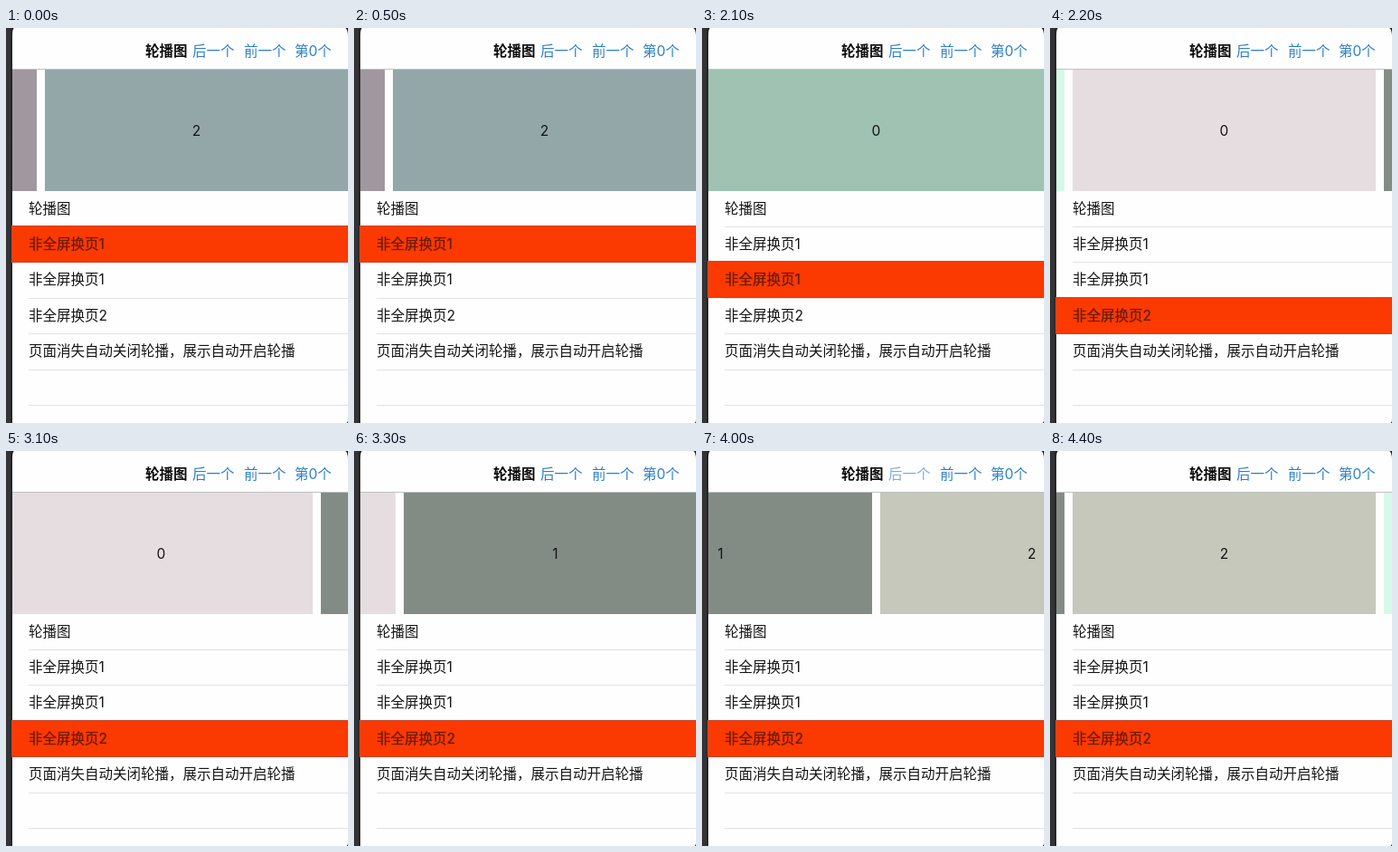
An HTML page for the animation above (4500 ms loop, 378 by 436 pixels).

```html
<!DOCTYPE html>
<html lang="zh-CN">
<head>
<meta charset="utf-8">
<title>轮播图</title>
<style>
  html, body { margin: 0; width: 100%; height: 100%; overflow: hidden; background: #303032; }
  #stage {
    position: absolute; left: 0; top: 0; width: 378px; height: 436px; overflow: hidden;
    background: linear-gradient(90deg, #343436 0 4px, #1f1f20 7px);
    font: 400 15.5px/20px Inter, "Noto Sans CJK SC", "Noto Sans CJK", sans-serif;
    color: #151515; white-space: nowrap;
  }
  #stage * { position: absolute; box-sizing: border-box; }
  #screen { left: 7px; top: 0; width: 371px; height: 436px; background: #fefefe; border-radius: 2px 3px 2px 0 / 8px 9px 4px 0; }
  #bar { left: 0; top: 0; width: 371px; height: 46px; border-bottom: 1px solid #bfc2c2; }
  #bar span { top: 16px; color: #2d7fca; }
  #bar .title { color: #0b0b0b; font-weight: 600; }
  #carousel { left: 0; top: 46px; width: 371px; height: 134px; overflow: hidden; }
  .page { top: 0; height: 134px; line-height: 135px; text-align: center; }
  .line { left: 18px; width: 353px; height: 1px; background: #e2e2e4; }
  .row { left: 0; width: 371px; height: 39px; padding-left: 18px; line-height: 40px; }
  .row.on { background: #fb3a02; color: #6d1b0a; box-shadow: 0 0 0 1px #c8452a; text-shadow: 0 0 1px #8a220c; }
</style>
</head>
<body>
<div id="stage">
  <div id="screen">
    <div id="bar">
      <span class="title" style="left:147px">轮播图</span>
      <span id="next" style="left:199px">后一个</span>
      <span style="left:256px">前一个</span>
      <span style="left:312px">第0个</span>
    </div>
    <div id="carousel"></div>
    <div id="list"></div>
  </div>
</div>
<script>
const LOOP = 4500, STEP = 100, ROW = 39.4, GAP = 9, PITCH = 344;
const $ = id => document.getElementById(id);

function add(parent, className, text = "", style = {}) {
  const el = document.createElement("div");
  el.className = className;
  el.textContent = text;
  Object.assign(el.style, style);
  parent.append(el);
  return el;
}

// Each scene: start time, selected row, page width, left edge of the first page.
const scenes = [
  { at: 0, row: 1, width: 335, left: 36 - PITCH, gap: GAP, pages: [[1, "#a1979e"], [2, "#93a7a9"]] },
  { at: 600, row: 2, width: 371, left: 0, gap: 0, pages: [[0, "#9fc2b3"]] },
  { at: 2200, row: 3, width: 335, left: 18 - PITCH, gap: GAP,
    pages: [[3, "#d7f9e9"], [0, "#e6dde1"], [1, "#828c85"], [2, "#c5c8ba"], [3, "#d7f9e9"]] }
];

for (const scene of scenes) {
  scene.track = add($("carousel"), "", "", { left: scene.left + "px", top: 0 });
  scene.pages.forEach(([label, color], i) => add(scene.track, "page", label, {
    left: i * (scene.width + scene.gap) + "px", width: scene.width + "px", background: color
  }));
}

const labels = ["轮播图", "非全屏换页1", "非全屏换页1", "非全屏换页2", "页面消失自动关闭轮播，展示自动开启轮播"];
const rowTop = i => Math.floor(180 + i * ROW) + "px";
for (let i = 1; i <= 6; i++) add($("list"), "line", "", { top: rowTop(i) });
const rows = labels.map((text, i) => add($("list"), "row", text, { top: rowTop(i) }));

const progress = (t, start, length) => Math.min(1, Math.max(0, (t - start) / length));
const ease = p => p * p * (3 - 2 * p);

// One page turns by itself, the next one after a tap on the button.
const SLIDE = 300, TURN = 3055, PRESS = 3750, RELEASE = 3850;
const scrollAt = t => PITCH * (ease(progress(t, TURN, SLIDE)) + ease(progress(t, RELEASE, SLIDE)));
const opacityAt = t => t < PRESS ? 1 : 0.25 + 0.75 * ease(progress(t, RELEASE - 50, 400));

function draw(now) {
  const t = Math.floor((now % LOOP) / STEP) * STEP;
  const active = scenes.findLast(s => s.at <= t);
  for (const s of scenes) s.track.style.display = s === active ? "block" : "none";
  active.track.style.transform = `translateX(${-Math.round(scrollAt(t))}px)`;
  rows.forEach((row, i) => row.classList.toggle("on", i === active.row));
  $("next").style.opacity = opacityAt(t);
}

const start = performance.now();
function tick() {
  draw(performance.now() - start);
  requestAnimationFrame(tick);
}
tick();
</script>
</body>
</html>
```
